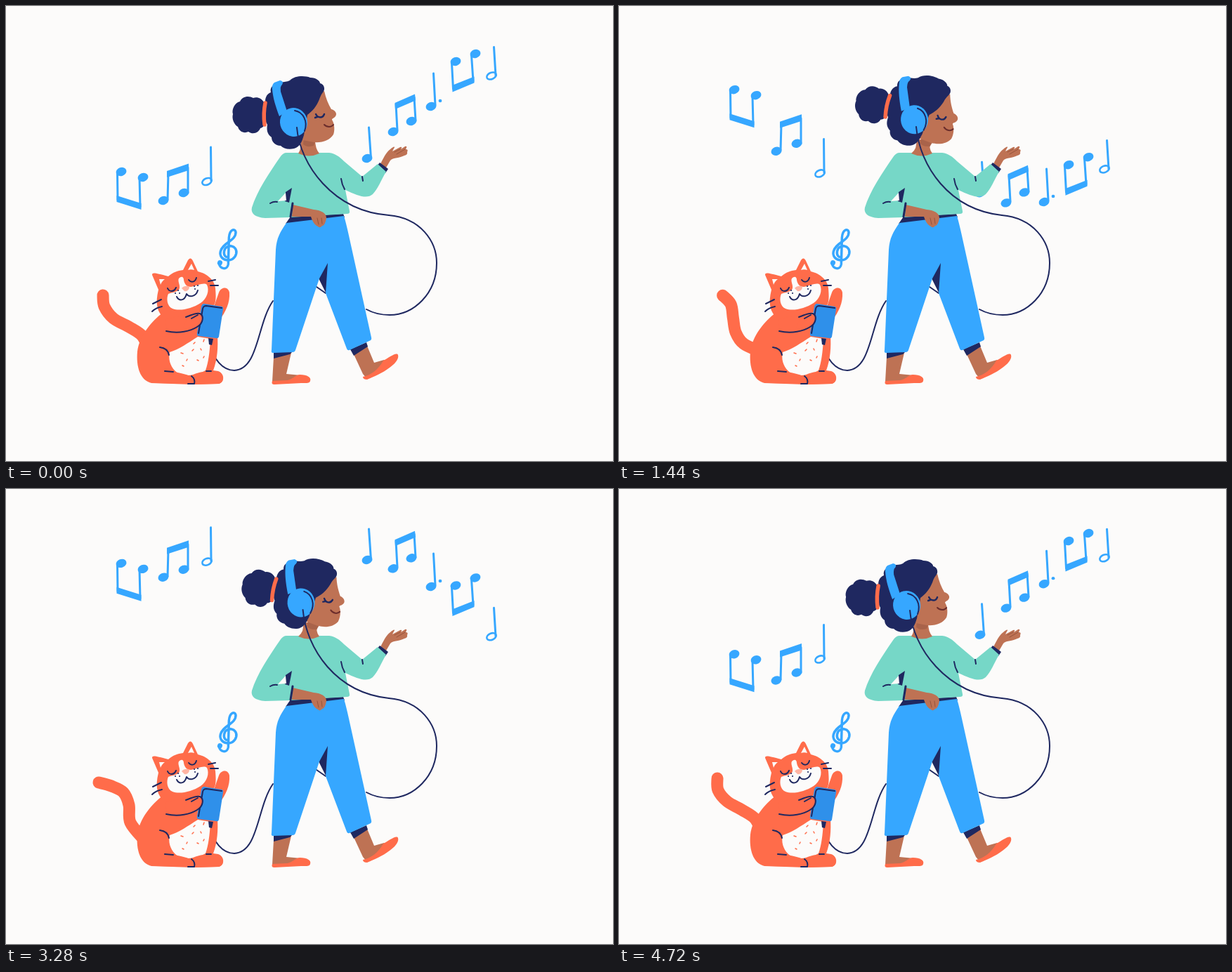
An HTML page with a canvas for the animation above (4.8 s loop, 864x648 px).

```html
<!DOCTYPE html>
<html lang="en">
<head>
<meta charset="utf-8">
<title>Music for two</title>
<style>
  html, body { margin: 0; width: 100%; height: 100%; overflow: hidden; background: #fcfbfa; }
  canvas { display: block; width: 864px; height: 648px; }
</style>
</head>
<body>
<canvas id="stage" width="864" height="648"></canvas>
<script>
const ctx = document.getElementById('stage').getContext('2d');
const LOOP = 4800, STEP = 80, TAU = Math.PI * 2;
const BG = '#fcfbfa', BLUE = '#36a7ff', NAVY = '#1f2860', ORANGE = '#ff6c4a',
      TEAL = '#76d7c7', SKIN = '#be7254', SHADE = '#96543b', PHONE = '#2f90ea';

const paths = new Map();
function shape(d) {
  if (!paths.has(d)) paths.set(d, new Path2D(d));
  return paths.get(d);
}
function fill(color, d) {
  ctx.fillStyle = color;
  ctx.fill(shape(d));
}
function line(color, width, d) {
  ctx.strokeStyle = color;
  ctx.lineWidth = width;
  ctx.stroke(shape(d));
}
function oval(color, x, y, rx, ry, turn = 0) {
  ctx.beginPath();
  ctx.ellipse(x, y, rx, ry, turn, 0, TAU);
  ctx.fillStyle = color;
  ctx.fill();
}
function turned(angle, x, y, draw) {
  ctx.save();
  ctx.translate(x, y);
  ctx.rotate(angle);
  ctx.translate(-x, -y);
  draw();
  ctx.restore();
}
const mix = (a, b, u) => a + (b - a) * u;
const smooth = u => {
  u = Math.min(1, Math.max(0, u));
  return u * u * (3 - 2 * u);
};

// Notes: each one bobs 320 ms after the one before it.
const head = (x, y) => oval(BLUE, x, y, 7.6, 6, -0.35);
function openHead(x, y) {
  ctx.beginPath();
  ctx.ellipse(x, y, 7, 4.6, -0.4, 0, TAU);
  ctx.strokeStyle = BLUE;
  ctx.lineWidth = 2.6;
  ctx.stroke();
}
const stem = d => line(BLUE, 3, d);
const notes = [
  () => {
    head(164, 236); head(195, 244);
    stem('M158.5 238L159 276M190 245L191 286');
    fill(BLUE, 'M157.5 270L192.5 281V290L157.5 279Z');
  },
  () => {
    head(224, 277); head(253, 266);
    stem('M231 238L230 276M259 230L259 266');
    fill(BLUE, 'M229 235L260 224.5V234L229 244Z');
  },
  () => { stem('M291.5 201L292 249'); openHead(286, 250); },
  () => { stem('M516.5 173L519.5 217'); head(514, 217); },
  () => {
    head(551, 179); head(577, 164);
    stem('M555 140L557 177M581 130L583 163');
    fill(BLUE, 'M553.5 138L582 125.5L583 134.5L554 147Z');
  },
  () => { stem('M608.5 96L611 141'); head(605, 143); oval(BLUE, 618, 135, 2.4, 2.2); },
  () => {
    head(640, 79); head(668, 68);
    stem('M634.5 81L636.5 118M662.5 70L665 107');
    fill(BLUE, 'M635 113L666.5 100.5V109.5L635.5 122.5Z');
  },
  () => { stem('M694.5 58.5L697 99'); openHead(691, 99.5); }
];
function drawNotes(t) {
  notes.forEach((draw, i) => {
    const wave = ms => Math.cos((ms - 20 - 320 * i) / LOOP * TAU);
    ctx.save();
    ctx.translate(0, 91 * (wave(t) - wave(0)));
    draw();
    ctx.restore();
  });
}
function drawClef(t) {
  const tilted = Math.floor((t + 320) / 800) % 2 === 0;
  turned(tilted ? 0.24 : 0, 316, 348, () => {
    oval(BLUE, 309, 368, 3.6, 3.6);
    line(BLUE, 3.5, 'M308 369C311 377 322 376 321 367L313 330C311 318 318 315 320.5 320C324 332 306 339 306 352C306 366 328.5 365 328.5 350C328 337 311 339 311 350C311 356 315 359 318 357');
  });
}

// Tail: poses from tip to root, blended around a 2400 ms cycle.
const tailPoses = [
  [0,    138, 412, 140, 428, 153, 445, 175, 457, 194, 470, 203, 490],
  [240,  132, 416, 136, 429, 149, 443, 171, 452, 191, 465, 202, 488],
  [640,  128, 421, 146, 427, 163, 432, 177, 446, 182, 476, 197, 504],
  [880,  132, 418, 150, 423, 167, 432, 175, 450, 177, 475, 197, 500],
  [1480, 148, 412, 159, 425, 162, 445, 166, 465, 178, 481, 202, 492],
  [2320, 140, 412, 141, 429, 154, 445, 175, 457, 194, 470, 203, 490]
];
const catmull = (a, b, c, d, u) =>
  b + u / 2 * (c - a + u * (2 * a - 5 * b + 4 * c - d + u * (3 * (b - c) + d - a)));
function drawTail(t) {
  const n = tailPoses.length, ms = t % 2400;
  let i = n - 1;
  while (tailPoses[i][0] > ms) i--;
  const pose = k => tailPoses[(i + k + n) % n];
  const start = pose(0)[0], end = pose(1)[0] || 2400;
  const u = (ms - start) / (end - start);
  const p = [];
  for (let k = 1; k < 13; k += 2) {
    p.push([k, k + 1].map(j => catmull(pose(-1)[j], pose(0)[j], pose(1)[j], pose(2)[j], u)));
  }
  ctx.beginPath();
  ctx.moveTo(...p[0]);
  for (let k = 0; k < p.length - 1; k++) {
    const before = p[Math.max(0, k - 1)], a = p[k], b = p[k + 1], after = p[Math.min(p.length - 1, k + 2)];
    ctx.bezierCurveTo(a[0] + (b[0] - before[0]) / 6, a[1] + (b[1] - before[1]) / 6,
      b[0] - (after[0] - a[0]) / 6, b[1] - (after[1] - a[1]) / 6, b[0], b[1]);
  }
  ctx.strokeStyle = ORANGE;
  ctx.lineWidth = 17;
  ctx.stroke();
}

function drawCat() {
  fill(ORANGE, 'M224 436C206 450 190 470 187 492C185 514 191 533 207 537L265 539L303 538C311 536 312 524 302 520L295 519C301 503 302 485 301 470L303 448C313 436 319 422 318 408C316 399 306 400 303 408L297 425L290 440Z');
  // Belly and legs
  fill(BG, 'M273 471L291 474C290 493 288 508 284 519C270 527 252 529 241 520C233 512 231 502 233 493C246 489 259 480 273 471Z');
  line(ORANGE, 1.5, 'M267 481l2-2M281 478l1-3M249 494l3 1M265 491l2-2M277 488l1 2M257 505l1-2M272 504l2 1M251 512l2 1M281 501l1-2');
  fill(ORANGE, 'M225 520C240 520 255 524 265 528L268 538L214 537ZM264 526C275 520 296 518 305 522C311 528 310 536 303 538L266 539Z');
  line(NAVY, 2, 'M219 486C227 487 231 491 232 497M226 520L238 521M264 527C268 530 269 534 268 538L259 538M285 520L292 520');

  // Head
  fill(ORANGE, 'M217 404L208 383C208 379 212 380 231 385C238 379 244 377 252 376L259 362C262 358 264 359 266 363L273 378C286 381 297 390 298 402C299 414 299 422 296 426L280 436L226 445C215 437 212 424 217 404Z');
  fill(BG, 'M218 389L226 389C223 391 221 394 220 397ZM259 376L264 367L268 376C265 375 262 375 259 376Z');
  fill(BG, 'M246 388C250 384 253 386 253 390C254 396 257 400 263 400C273 398 282 393 286 397C290 405 286 417 277 423C265 431 247 435 237 431C229 428 228 416 231 410C236 408 246 407 247 402C248 397 244 392 246 388Z');
  fill('#ffb4a2', 'M250 402C253 398 259 398 261 400C261 404 257 407 254 406Z');
  line(NAVY, 2, 'M230 402C232 407 239 408 242 401M260 390C263 394 269 394 271 387M243 414C246 420 254 421 257 410C260 415 270 415 273 405');
  line(NAVY, 2, 'M209 424L221 418M208 435C212 431 217 429 222 428M288 392L298 390M291 398L302 398');
  line(NAVY, 2, 'M241 409h.1M245 405h.1M247 409h.1M268 399h.1M273 398h.1M269 403h.1');

  // Player and paws
  fill(ORANGE, 'M226 446L270 437L282 440L279 453L260 463L230 464Z');
  fill(PHONE, 'M282 424L307 428Q310 429 309 432L303 471Q302 474 299 473L274 470Q271 469 272 466L278 428Q279 424 282 424Z');
  line(NAVY, 2, 'M307 430L285 427Q281 427 280 431L274 466');
  fill(ORANGE, 'M258 445C267 436 279 436 280 441C281 449 277 455 266 461L250 463Z');
  line(NAVY, 2, 'M228 463C246 467 263 463 272 457C281 452 282 441 276 438C270 436 263 441 256 443M264 445L273 440');
  fill(NAVY, 'M288 473L295 474L293 483L289 482Z');
}

function drawCableBack() {
  line(NAVY, 2, 'M291 480C294 503 309 519 325 519C360 517 357 453 380 420M442 400L455 409M545 298C590 302 613 335 613 366C613 410 580 440 546 440C533 440 522 437 513 432');
}

function drawLegs() {
  fill(SKIN, 'M381 500L406 494L399 524L420 526L410 535L379 535ZM495 496L514 484L524 508L538 504L545 508L513 530L508 524Z');
  fill(NAVY, 'M381 493L410 490L404 496L381 502ZM490 489L513 479L515 485L495 498Z');
  fill(ORANGE, 'M379 534L401 533C409 531 411 526 418 525C429 525 435 529 433 534C432 538 426 537 420 537L382 539Q377 539 379 534ZM508 528C519 526 530 518 537 505C545 501 556 492 558 497C560 503 552 511 546 515C536 523 523 528 514 532Q508 532 508 528Z');
  fill(NAVY, 'M459 362L445 388L457 412ZM398 310L405 300L480 296L482 301Z');
  fill(BLUE, 'M399 309L481 299C484 309 486 318 488 327L520 472Q521 476 517 477L489 490Q486 491 485 488L455 409L458 366L446 388L412 490Q411 493 408 493L380 494Q377 494 378 490L384 347C385 331 390 322 399 309Z');
}

function drawTorso() {
  fill(NAVY, 'M399 263L409 257L406 284L398 281Z');
  fill(SKIN, 'M532 227C537 217 541 208 547 204C551 200 555 199 552 203L550 207L561 201Q565 200 562 204L568 200Q572 199 569 204Q573 204 571 208Q572 212 567 213C559 217 550 216 547 220L540 232Z');
  line(SHADE, 1, 'M553 208L561 204M556 211L568 204');
  fill(NAVY, 'M527 229L532 223L544 232L540 238Z');
  fill(TEAL, 'M399 209L416 209C425 213 437 213 445 209L460 209C469 210 475 215 481 221L507 243L529 225L541 236C534 248 529 261 522 268C514 275 502 271 483 262L489 292Q490 296 485 296L405 301L369 302C354 301 348 295 350 287C357 264 375 237 391 214Q395 209 399 209Z');
  fill(NAVY, 'M398 265L407 259L403 280L397 278Z');
  fill(BG, 'M398 266L399 277L387 278Z');
  fill(SKIN, 'M408 283L438 290C449 291 456 295 456 302C455 308 453 313 450 313Q447 317 444 314C439 312 436 306 434 300L407 300Z');
  line(SHADE, 1, 'M443 302L445 311M449 302L450 310');
  line(NAVY, 2, 'M376 281Q381 278 386 279M477 246Q478 254 482 261M507 243L508 249');
  line(NAVY, 3, 'M408 281L405 300');
}

function drawNeck(p) {
  const x = 4 * p;
  ctx.beginPath();
  ctx.moveTo(419 + x, 190);
  ctx.quadraticCurveTo(421 + x, 203, 416, 210);
  ctx.quadraticCurveTo(431, 217, 446, 210);
  ctx.quadraticCurveTo(440, 203, 440 + x, 190);
  ctx.fillStyle = SKIN;
  ctx.fill();
}

function drawHead(p) {
  turned(0.177 * p, 436, 226, () => {
    fill('#a9634a', 'M424 188L441 191L438 199Q428 202 423 197Z');
    fill(SKIN, 'M425 135L453 121C455 131 459 140 463 147C468 148 472 153 469 157C467 160 464 160 464 162C468 168 468 178 466 183C461 191 451 195 438 194L418 190Z');
    fill(NAVY, 'M381 113C388 106 396 110 404 106C411 99 425 99 433 102C442 102 447 107 447 110C453 111 455 119 451 123C448 127 447 130 446 133C442 143 436 150 429 155L424 184C421 194 418 201 410 203C402 205 395 203 391 199C383 199 378 193 378 187C371 182 371 175 372 169C366 160 368 150 370 143C367 132 371 125 377 123C376 119 377 115 381 113Z');
    fill(NAVY, 'M367 137C364 132 358 129 352 131C345 127 336 129 333 136C325 138 321 148 323 154C321 161 325 169 330 172C332 179 339 182 345 179C352 184 360 180 362 174C367 173 369 168 369 164Z');
    line(ORANGE, 5.5, 'M369 138Q366 153 368 169');
    fill(BLUE, 'M379 119Q378 112 382 109L390 106Q396 107 393 112Q390 114 391 122L400 150L389 157C383 141 380 130 379 119Z');
    oval(BLUE, 409.5, 165.5, 19.5, 20.5, -0.25);
    line(NAVY, 2, 'M411 149C423 151 430 164 425 178');
    line(NAVY, 2.4, 'M441 154C444 160 451 160 453 154M443 158L440 159');
    line('#6b2d2c', 2, 'M453 169C457 173 463 173 466 169');
  });
}

function drawCableFront(p) {
  ctx.beginPath();
  ctx.moveTo(mix(414, 423, p), 173 - p);
  ctx.bezierCurveTo(mix(418, 428, p), mix(225, 228, p), mix(465, 470, p), mix(292, 290, p), 545, 298);
  ctx.strokeStyle = NAVY;
  ctx.lineWidth = 2;
  ctx.stroke();
}

// Head leans forward, rests, then leans back, twice per loop.
function lean(t) {
  const ms = t % 2400;
  return smooth((ms - 80) / 920) - smooth((ms - 1450) / 920);
}

function draw(now) {
  const t = Math.floor(now % LOOP / STEP) * STEP;
  const p = lean(t);
  ctx.fillStyle = BG;
  ctx.fillRect(0, 0, 864, 648);
  ctx.lineCap = ctx.lineJoin = 'round';
  drawNotes(t);
  drawClef(t);
  drawCableBack();
  drawTail(t);
  drawCat();
  drawLegs();
  drawTorso();
  drawNeck(p);
  drawHead(p);
  drawCableFront(p);
}

const began = performance.now();
function tick() {
  draw(performance.now() - began);
  requestAnimationFrame(tick);
}
tick();
</script>
</body>
</html>
```
